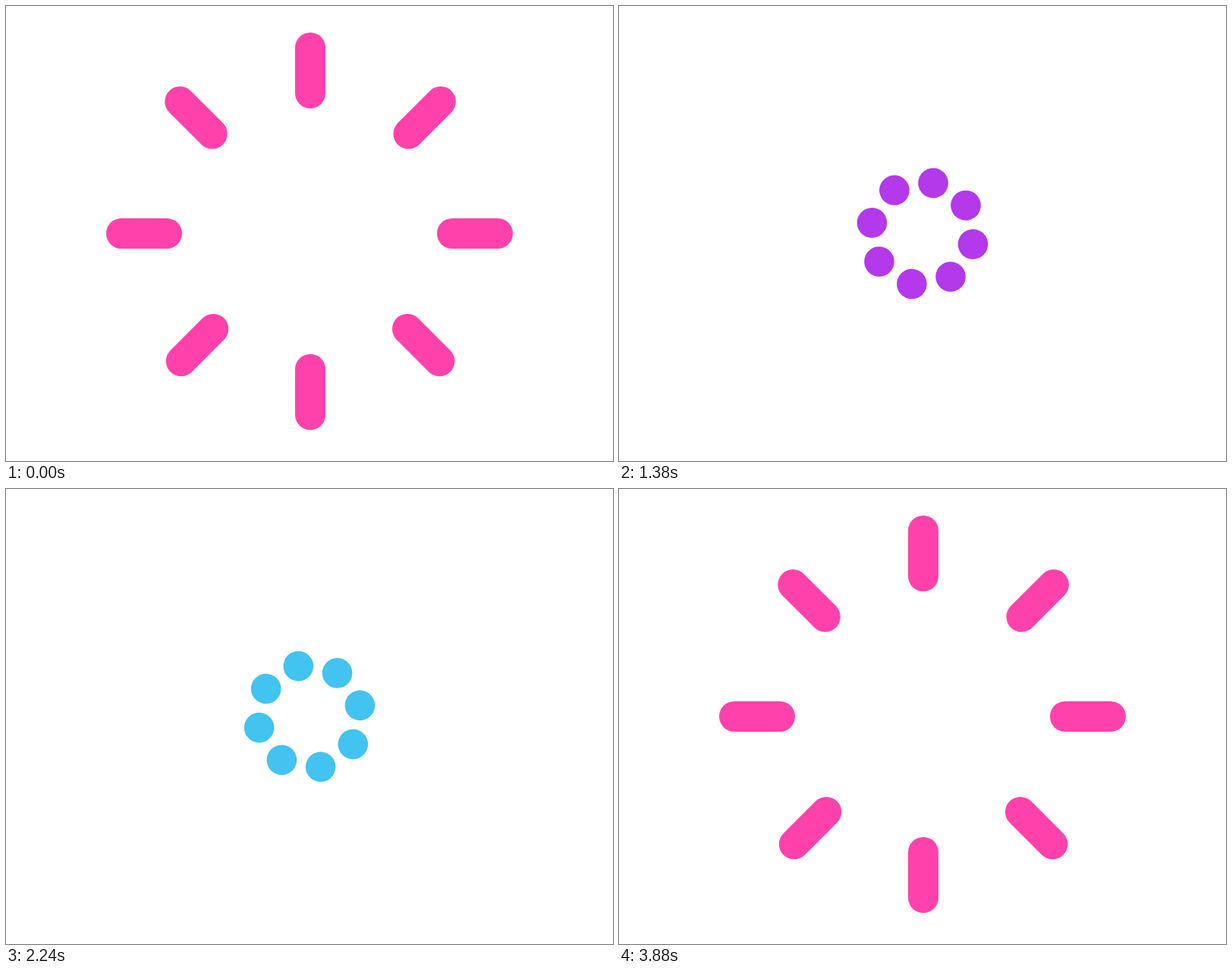
An HTML page for the animation above (3920 ms loop, 800 by 600 pixels).

```html
<!DOCTYPE html>
<html lang="en">
<head>
<meta charset="utf-8">
<title>Loader</title>
<style>
  html, body { margin: 0; width: 100%; height: 100%; overflow: hidden; background: #fff; }
  svg { display: block; width: 800px; height: 600px; }
</style>
</head>
<body>
<svg viewBox="0 0 800 600">
  <g id="ring" stroke-linecap="round"></g>
</svg>
<script>
const LOOP = 3920, STEP = 20, LAST = 3880;
const PINK = [255, 66, 171], PURPLE = [190, 43, 235], CYAN = [47, 220, 240];
const REST_RADIUS = 68, FULL_LENGTH = 60;

// Centres of the spread pills relative to the stage centre, clockwise from the top.
const SPREAD = [
  [1, -215], [151.7, -152.7], [218, 0], [150.2, 147.1],
  [1, 209], [-148, 147.1], [-218, 0], [-149.5, -152.7]
];

const ring = document.getElementById('ring');
const pills = SPREAD.map(([x, y], i) => {
  const angle = i * Math.PI / 4;
  const node = document.createElementNS('http://www.w3.org/2000/svg', 'line');
  ring.appendChild(node);
  return { node, x, y, dx: Math.sin(angle), dy: -Math.cos(angle) };
});

const lerp = (a, b, k) => a + (b - a) * k;
const mix = (a, b, k) => a.map((v, i) => lerp(v, b[i], k));

// Cubic Bezier easing with flat ends: control points (x1, 0) and (x2, 1).
function ease(t, start, end, x1 = 0.36, x2 = 0.18) {
  const u = (t - start) / (end - start);
  if (u <= 0) return 0;
  if (u >= 1) return 1;
  let lo = 0, hi = 1;
  for (let i = 0; i < 30; i++) {
    const s = (lo + hi) / 2, r = 1 - s;
    if (3 * x1 * s * r * r + 3 * x2 * s * s * r + s * s * s < u) lo = s;
    else hi = s;
  }
  return lo * lo * (3 - 2 * lo);
}

function draw(t) {
  const gather = ease(t, 0, 1183);
  const spin = ease(t, 1210, 3008, 0.2, 0.25);
  const burst = ease(t, 2980, LAST);
  const spread = 1 - gather + burst;
  const half = FULL_LENGTH / 2 * (1 - ease(t, 0, 697) + ease(t, 2980, 3489));
  const color = mix(mix(mix(PINK, PURPLE, gather), CYAN, spin), PINK, burst);

  ring.setAttribute('transform', `translate(400 300) rotate(${720 * spin})`);
  ring.setAttribute('stroke', `rgb(${color.map(Math.round)})`);
  ring.setAttribute('stroke-width', lerp(39.6, 40, spread));

  for (const { node, x, y, dx, dy } of pills) {
    const cx = lerp(REST_RADIUS * dx, x, spread);
    const cy = lerp(REST_RADIUS * dy, y, spread);
    const reach = Math.max(half, 0.01);
    node.setAttribute('x1', cx - dx * reach);
    node.setAttribute('y1', cy - dy * reach);
    node.setAttribute('x2', cx + dx * reach);
    node.setAttribute('y2', cy + dy * reach);
  }
}

const begin = performance.now();
function tick() {
  const t = (performance.now() - begin) % LOOP;
  draw(Math.min(LAST, Math.floor(t / STEP) * STEP));
  requestAnimationFrame(tick);
}
tick();
</script>
</body>
</html>
```
